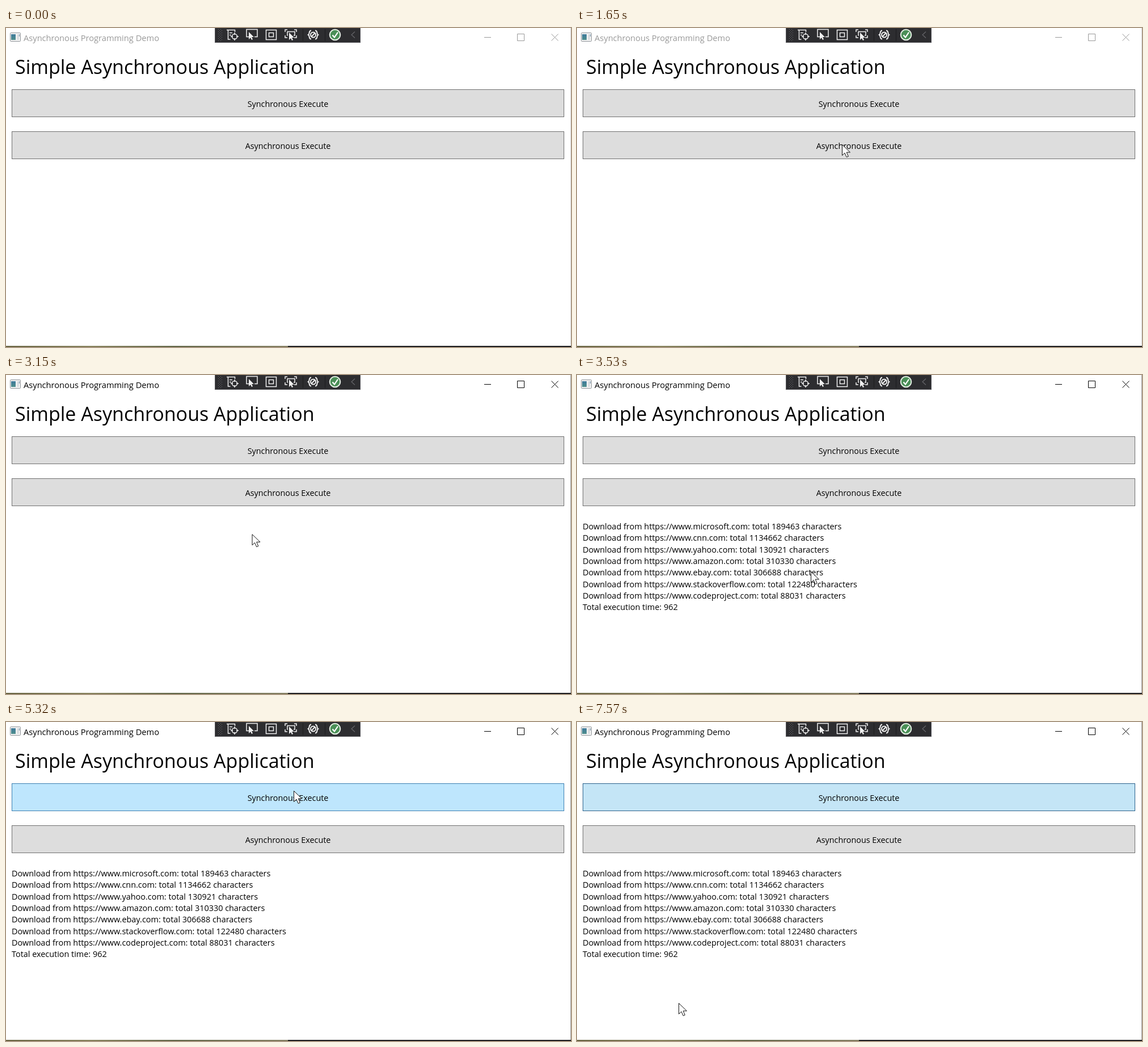
An HTML page that plays this animation: 996 px wide and 562 px high, repeating every 8000 ms.

```html
<!DOCTYPE html>
<html lang="en">
<head>
<meta charset="utf-8">
<title>Asynchronous Programming Demo</title>
<style>
html, body { margin: 0; width: 100%; height: 100%; overflow: hidden; background: #fff; }
svg { display: block; width: 100vw; height: 100vh; }
text { font: 14.35px "Open Sans", "Noto Sans", sans-serif; white-space: pre; }
.title { font-size: 14.65px; fill: currentColor; }
.heading { font-size: 34px; }
.label { text-anchor: middle; }
.results text { font-size: 14.43px; }
.caption { fill: none; stroke: currentColor; }
.icon { fill: none; stroke: #f1f1f1; stroke-width: 1.5; }
.solid { fill: #f1f1f1; stroke: none; }

.window, .button, .results { animation: 8s step-end infinite; }
.window { animation-name: activate; }
.button { fill: #ddd; stroke: #707070; }
.sync { animation-name: sync; }
.async { animation-name: async; }
.results { animation-name: results; }
.cursor { fill: #fff; stroke: #111; animation: move 8s linear infinite, appear 8s step-end infinite; }

@keyframes activate {
  0% { color: #999; }
  25.6%, 100% { color: #000; }
}
@keyframes sync {
  0%, 20.55%, 64.5% { fill: #ddd; stroke: #707070; }
  9%, 63.6%, 66.45% { fill: #bee6fd; stroke: #3c7fb1; }
  71.2%, 100% { fill: #c4e5f6; stroke: #2c628b; }
}
@keyframes async {
  0%, 33.4%, 43.1%, 63.6%, 100% { fill: #ddd; stroke: #707070; }
  21.5%, 28.35%, 40.3%, 61.6% { fill: #bee6fd; stroke: #3c7fb1; }
  26.5% { fill: #c4e5f6; stroke: #2c628b; }
}
@keyframes results {
  0% { visibility: hidden; }
  41.3%, 100% { visibility: visible; }
}
@keyframes appear {
  0% { visibility: hidden; }
  5.1%, 100% { visibility: visible; }
}
/* The pointer is sampled about every 78 ms, so each leg jumps in steps. */
@keyframes move {
  0%, 5.1% { translate: 430px 630px; animation-timing-function: steps(3, start); }
  8.05% { translate: 492px 300px; animation-timing-function: steps(2, start); }
  10% { translate: 513px 148px; animation-timing-function: steps(2, start); }
  11.95%, 15.7% { translate: 517px 124px; animation-timing-function: steps(2, start); }
  17.7%, 19.6% { translate: 521px 128px; animation-timing-function: steps(2, start); }
  21.5% { translate: 467px 205px; animation-timing-function: steps(1, start); }
  22.5%, 25.6% { translate: 432px 213px; animation-timing-function: steps(2, start); }
  27.4%, 30.5% { translate: 412px 208px; animation-timing-function: steps(3, start); }
  33.4% { translate: 405px 206px; animation-timing-function: steps(3, start); }
  36.4% { translate: 380px 460px; animation-timing-function: steps(1, start); }
  37.4% { translate: 384px 455px; animation-timing-function: steps(4, start); }
  41.3% { translate: 450px 222px; animation-timing-function: steps(2, start); }
  43.1% { translate: 448px 250px; animation-timing-function: steps(2, start); }
  45% { translate: 412px 346px; animation-timing-function: steps(3, start); }
  48% { translate: 215px 451px; animation-timing-function: steps(4, start); }
  52%, 52.85% { translate: 131px 410px; animation-timing-function: steps(1, start); }
  53.85% { translate: 146px 405px; animation-timing-function: steps(1, start); }
  54.8%, 56.7% { translate: 166px 411px; animation-timing-function: steps(2, start); }
  58.7%, 59.85% { translate: 154px 411px; animation-timing-function: steps(3, start); }
  62.6% { translate: 470px 215px; animation-timing-function: steps(1, start); }
  63.6% { translate: 504px 179px; animation-timing-function: steps(2, start); }
  65.5%, 66.45% { translate: 508px 102px; animation-timing-function: steps(1, start); }
  67.4% { translate: 507px 121px; animation-timing-function: steps(1, start); }
  68.4%, 70.3% { translate: 507px 124px; animation-timing-function: steps(1, start); }
  71.3%, 74.3% { translate: 503px 125px; animation-timing-function: steps(4, start); }
  78.2%, 83.95% { translate: 603px 415px; animation-timing-function: steps(2, start); }
  85.9% { translate: 540px 356px; animation-timing-function: steps(3, start); }
  88.9% { translate: 330px 410px; animation-timing-function: steps(3, start); }
  91.85%, 93.45% { translate: 176px 500px; animation-timing-function: steps(2, start); }
  95.5%, 100% { translate: 179px 495px; }
}
</style>
</head>
<body>
<svg viewBox="0 0 996 562">
  <defs>
    <linearGradient id="desktop">
      <stop offset="0" stop-color="#66623f"/>
      <stop offset=".3" stop-color="#85805a"/>
      <stop offset=".6" stop-color="#5f6445"/>
      <stop offset="1" stop-color="#827d60"/>
    </linearGradient>
    <linearGradient id="pane" x2="0" y2="1">
      <stop offset="0" stop-color="#3f7a9c"/>
      <stop offset="1" stop-color="#4f8f8c"/>
    </linearGradient>
    <pattern id="grip" width="4" height="4" patternUnits="userSpaceOnUse">
      <path d="M0 0h1v1H0zM2 2h1v1H2z" fill="#68686c"/>
    </pattern>
    <path id="arrow" d="M0 0V13L3 10 5 14 7 13 5 9H9Z"/>
  </defs>

  <rect width="996" height="562" fill="#fff"/>
  <g class="window">
    <rect x="7.5" y="8.5" width="18" height="15" rx="1" fill="#f4f4f4" stroke="#8d9297"/>
    <rect x="9" y="11" width="8" height="10" fill="url(#pane)"/>
    <path d="M19 11h4v10h-4z" fill="#dcdfe2"/>
    <path d="M23.5 11v4" stroke="#6f8ea6"/>
    <text class="title" x="31" y="23">Asynchronous Programming Demo</text>
    <path class="caption" d="M843 16.5h12M901.5 10.5h12v12h-12zM961.5 10.5l12 12m0-12l-12 12"/>
    <path d="M995.5 0V560" stroke="currentColor" opacity=".4"/>
  </g>
  <rect y="560" width="497" height="2" fill="url(#desktop)"/>
  <rect x="497" y="560" width="499" height="2" fill="#1c1c1e"/>

  <g>
    <rect x="368.5" y="-1" width="256" height="26.5" fill="#2d2d30" stroke="#5a5a5e"/>
    <rect x="373" y="1" width="8" height="23" fill="url(#grip)"/>
    <path d="M523.5 2v21M562.5 2v21" stroke="#1c1c1e"/>
    <g class="icon">
      <path d="M389 3.5h15M391.5 3v17h4M394 8.5h5M394 12.5h3M403.5 3v4"/>
      <circle cx="403" cy="15" r="4.5"/>
      <path d="M403 8v4M403 18v4M396 15h4M406 15h4"/>
      <path d="M428 15.5h-4v-13h19v13h-5"/>
      <use class="solid" href="#arrow" x="428" y="7"/>
      <path d="M458.5 3.5h18v17h-18zM463.5 8.500h8v7h-8z"/>
      <path d="M492 7V3h4M508 3h4v4M492 13v4h4M512 13v4h-4M497 13h-1V6.5h13V13h-2"/>
      <use class="solid" href="#arrow" x="499" y="8"/>
      <g stroke-width="2">
        <path d="M538 4.5c-5 0-2 6-5 7.5 3 1.5 0 7.5 5 7.5M545 4.5c5 0 2 6 5 7.5-3 1.5 0 7.5-5 7.5"/>
        <circle cx="541.5" cy="12" r="4.5"/>
        <path d="M538.5 15l6-6"/>
      </g>
    </g>
    <circle cx="580" cy="12" r="9.3" fill="#4a8f57" stroke="#e4efe4" stroke-width="2"/>
    <path d="M575.500 12.500l3.500 4 6-9" fill="none" stroke="#fff" stroke-width="2.200"/>
    <path d="M615 6.500l-6 5.500 6 5.500" fill="none" stroke="#66666a" stroke-width="1.200"/>
  </g>

  <text class="heading" x="16" y="80.5">Simple Asynchronous Application</text>
  <rect class="button sync" x="10.5" y="108.5" width="973" height="48"/>
  <text class="label" x="497" y="139">Synchronous Execute</text>
  <rect class="button async" x="10.5" y="182.5" width="973" height="48"/>
  <text class="label" x="497" y="213">Asynchronous Execute</text>

  <g class="results"></g>
  <path class="cursor" d="M.5.5V19.5L5 15.2 8.2 22.5 11.3 21.2 8.2 14H14.5Z"/>
</svg>
<script>
const downloads = {
  microsoft: 189463, cnn: 1134662, yahoo: 130921, amazon: 310330,
  ebay: 306688, stackoverflow: 122480, codeproject: 88031
};
const lines = Object.entries(downloads).map(([site, size]) =>
  `Download from https://www.${site}.com: total ${size} characters`);
lines.push('Total execution time: 962');

document.querySelector('.results').innerHTML = lines.map((line, i) =>
  `<text x="10" y="${272 + i * 20.33}">${line}</text>`).join('');
</script>
</body>
</html>
```
